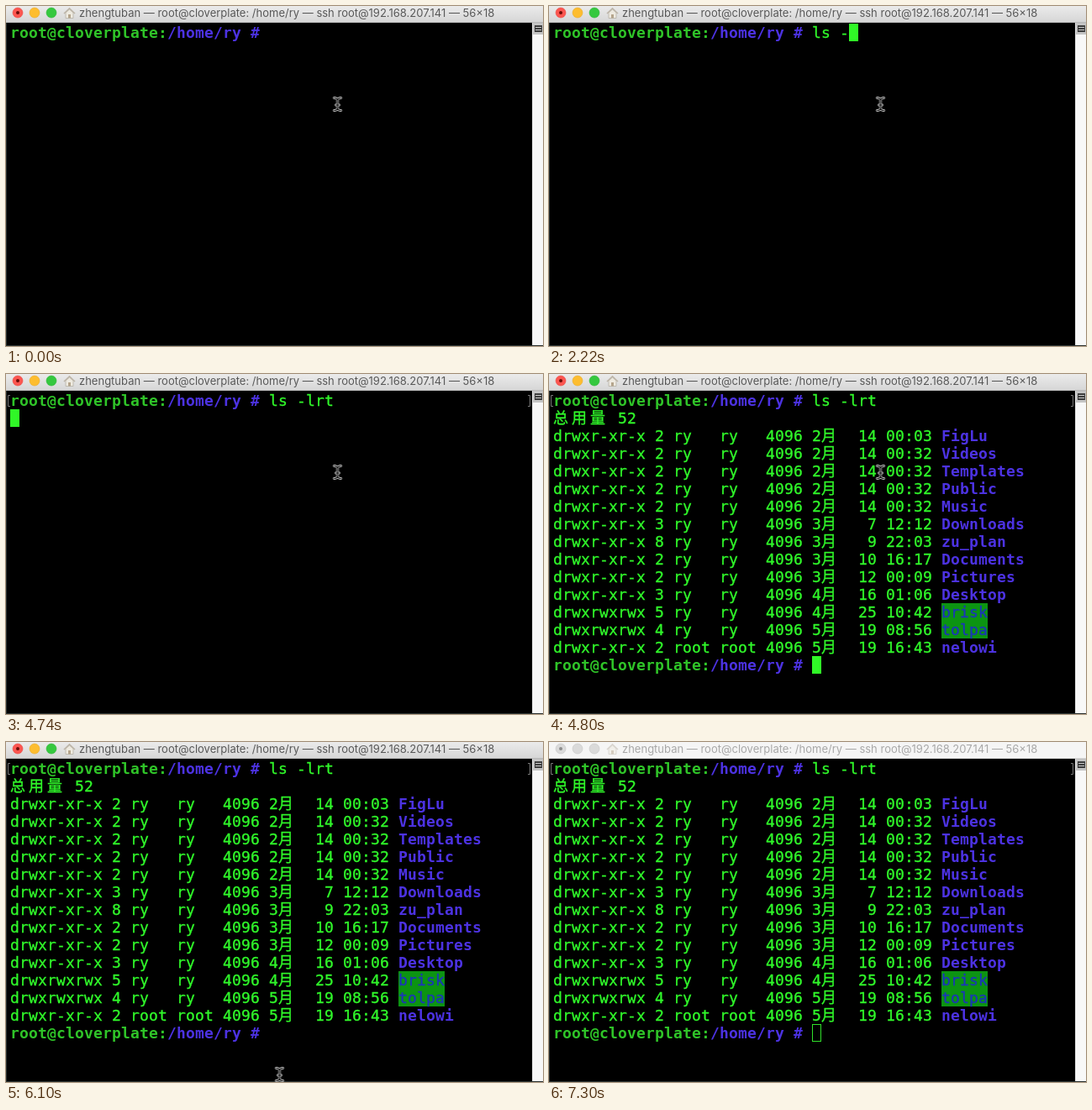
Animation, 639 px wide and 405 px high, one loop 7400 ms. Source, as an HTML page:

```html
<!DOCTYPE html>
<html lang="zh">
<head>
<meta charset="utf-8">
<title>Terminal</title>
<style>
html, body { margin: 0; width: 100%; height: 100%; overflow: hidden; background: #000; }
svg { display: block; width: 100%; height: 100%; }
text { white-space: pre; }
#screen text {
  font: 18px "DejaVu Sans Mono", monospace; letter-spacing: .163px;
  fill: #30f82a; stroke: #30f82a; stroke-width: .35px;
}
#screen .host { font-weight: bold; fill: #2fc428; stroke: none; }
#screen .path { font-weight: bold; fill: #4c32e2; stroke: none; }
#screen .open { fill: #1c36b8; stroke: #1c36b8; }
#screen .cjk { font-family: "Noto Sans CJK SC", "Noto Sans CJK", sans-serif; letter-spacing: 4px; }
.title { font: 13px Inter, sans-serif; fill: #585858; }
.idle .title { fill: #a8a8a8; }

.anim, #caret, #block, #mouse { animation: 7.4s step-end infinite; }
#caret { animation-name: type; }
#block { animation-name: blink; }
#mouse { animation-name: move; }
#marks { animation-name: marks; }
#list { animation-name: list; }
.blur { animation-name: blur; }

@keyframes type {
  0% { transform: translate(313px, 21px); }
  9.729% { transform: translate(335px, 21px); }
  20.27% { transform: translate(346px, 21px); }
  30% { transform: translate(357px, 21px); }
  42.162% { transform: translate(368px, 21px); }
  53.513% { transform: translate(379px, 21px); }
  57.567% { transform: translate(390px, 21px); }
  64.054% { transform: translate(5px, 42px); }
  64.864%, 100% { transform: translate(313px, 336px); }
}
@keyframes blink {
  0%, 38.918%, 51.891%, 78.378%, 91.756%, 100% { opacity: 0; }
  4.864%, 42.162%, 53.513%, 85.405% { opacity: 1; }
}
@keyframes move {
  0% { transform: translate(394.5px, 117px); }
  75.27% { transform: translate(387px, 134px); }
  76.081% { transform: translate(371.5px, 169px); }
  76.891% { transform: translate(362px, 205px); }
  77.567% { transform: translate(354px, 239px); }
  78.378% { transform: translate(347px, 271px); }
  79.189% { transform: translate(341px, 301px); }
  80% { transform: translate(336px, 328px); }
  80.81% { transform: translate(332px, 353px); }
  81.621% { transform: translate(328px, 375px); }
  82.432% { transform: translate(325.5px, 396px); }
  83.108%, 100% { transform: translate(324px, 430px); }
}
@keyframes marks { 0% { opacity: 0; } 64.054%, 100% { opacity: 1; } }
@keyframes list { 0% { opacity: 0; } 64.864%, 100% { opacity: 1; } }
@keyframes blur { 0% { opacity: 0; } 98.648%, 100% { opacity: 1; } }
</style>
</head>
<body>
<svg viewBox="0 0 639 405" xmlns="http://www.w3.org/2000/svg">
  <defs>
    <linearGradient id="bar" x2="0" y2="1">
      <stop stop-color="#ebebeb"/><stop offset="1" stop-color="#d5d5d5"/>
    </linearGradient>
    <path id="beam" d="M-4-7.5Q0-7.5 0-4.5V4.5Q0 7.5-4 7.5M4-7.5Q0-7.5 0-4.5M0 4.5Q0 7.5 4 7.5M-2 1H2"
      fill="none" stroke-linecap="round"/>
    <g id="house">
      <path d="M71 8V14.5H80V8L75.5 4Z" fill="#eeeae0" stroke="#b5b1a8" stroke-width=".8"/>
      <path d="M69 9L75.5 2.8L82 9" fill="none" stroke="#bdb5a8" stroke-width="1.6"/>
      <rect x="74" y="10" width="3" height="4.5" fill="#b5a58c"/>
    </g>
  </defs>

  <rect width="639" height="405"/>
  <g id="screen">
    <g id="marks" class="anim" fill="none" stroke="#777">
      <path d="M5 25.5H2.5V38.5H5M621 25.5H623.5V38.5H621"/>
    </g>
    <g id="top"></g>
    <g id="list" class="anim"></g>
    <g id="caret">
      <rect width="84" height="21"/>
      <rect id="block" width="11" height="21" fill="#30f727"/>
      <rect class="anim blur" x=".5" y=".5" width="10" height="20" fill="none" stroke="#30e02a"/>
    </g>
  </g>

  <path d="M.5 20V405M0 404.5H639" stroke="#2b3331"/>
  <rect x="626" y="20" width="13" height="384" fill="#f8f8f8"/>
  <path d="M626.5 20V404" stroke="#dcdcdc"/>
  <rect x="627" y="20" width="12" height="14" fill="#c4c4c4"/>
  <rect x="629" y="23" width="9" height="8" fill="#3c3c3c"/>
  <path d="M630 25.5H637M630 28.5H637" stroke="#c8c8c8"/>

  <g>
    <rect width="639" height="20" fill="url(#bar)"/>
    <path d="M0 19.5H639" stroke="#b8b8b8"/>
    <g stroke-width=".6">
      <circle cx="14" cy="8" r="6" fill="#fc5650" stroke="#e84a44"/>
      <circle cx="34" cy="8" r="6" fill="#fdbd2f" stroke="#e8aa28"/>
      <circle cx="54" cy="8" r="6" fill="#35c83f" stroke="#2cb436"/>
    </g>
    <circle cx="14" cy="8" r="2" fill="#6b0c08"/>
    <use href="#house"/>
    <text class="title" x="87" y="13"></text>
  </g>
  <g class="anim blur idle">
    <rect width="639" height="20" fill="#f5f5f5"/>
    <path d="M0 19.5H639" stroke="#d2d2d2"/>
    <g fill="#dadada" stroke="#c6c6c6" stroke-width=".6">
      <circle cx="14" cy="8" r="6"/><circle cx="34" cy="8" r="6"/><circle cx="54" cy="8" r="6"/>
    </g>
    <circle cx="14" cy="8" r="2" fill="#8c8c8c"/>
    <use href="#house" opacity=".5"/>
    <text class="title" x="87" y="13"></text>
  </g>

  <g id="mouse">
    <use href="#beam" stroke="#d8d8d8" stroke-width="2.8"/>
    <use href="#beam" stroke="#000" stroke-width="1.2"/>
  </g>
</svg>
<script>
const NS = "http://www.w3.org/2000/svg";
const CELL = 11, LINE = 21, LEFT = 5, TOP = 21;
const user = "ry", host = "root@cloverplate:", path = "/home/" + user;
const list = document.getElementById("list");
const first = document.getElementById("top");

function add(parent, tag, attrs, str = "") {
  const el = document.createElementNS(NS, tag);
  for (const key in attrs) el.setAttribute(key, attrs[key]);
  el.textContent = str;
  parent.append(el);
}

function put(parent, col, row, str, cls = "") {
  add(parent, "text", { x: LEFT + col * CELL, y: TOP + row * LINE + 17, class: cls }, str);
}

function prompt(parent, row) {
  put(parent, 0, row, host, "host");
  put(parent, host.length, row, path + " #", "path");
}

for (const el of document.querySelectorAll(".title"))
  el.textContent = `zhengtuban — ${host} ${path} — ssh root@192.168.207.141 — 56×18`;

prompt(first, 0);
put(first, 28, 0, "ls -lrt");

// links, month, day, time, name
const entries = `2 2 14 00:03 FigLu
2 2 14 00:32 Videos
2 2 14 00:32 Templates
2 2 14 00:32 Public
2 2 14 00:32 Music
3 3 7 12:12 Downloads
8 3 9 22:03 zu_plan
2 3 10 16:17 Documents
2 3 12 00:09 Pictures
3 4 16 01:06 Desktop
5 4 25 10:42 brisk
4 5 19 08:56 tolpa
2 5 19 16:43 nelowi`.split("\n");

put(list, 0, 1, "总用量", "cjk");
put(list, 7, 1, "52");
entries.forEach((entry, i) => {
  const [links, month, day, time, name] = entry.split(" ");
  const row = i + 2;
  const open = i === 10 || i === 11;
  const owner = (i === 12 ? "root" : user).padEnd(5);
  put(list, 0, row, `${open ? "drwxrwxrwx" : "drwxr-xr-x"} ${links} ${owner}${owner}4096 ${month}`);
  put(list, 29, row, "月", "cjk");
  put(list, 33, row, `${day.padStart(2)} ${time}`);
  if (open) add(list, "rect", {
    x: LEFT + 42 * CELL, y: TOP + row * LINE, width: name.length * CELL, height: LINE, fill: "#0c9412"
  });
  put(list, 42, row, name, open ? "open" : "path");
});
prompt(list, 15);
</script>
</body>
</html>
```
